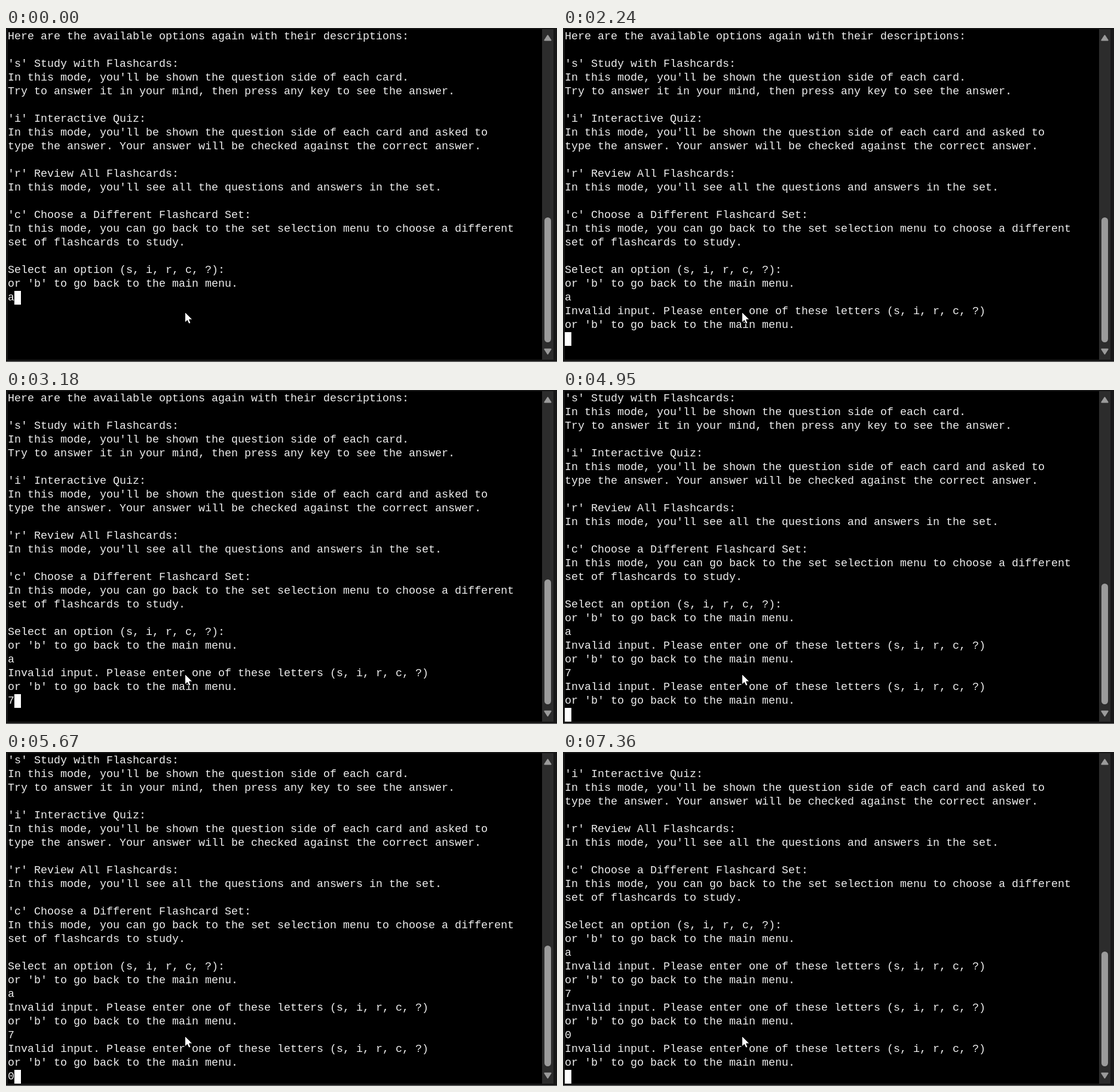
Recreate the animation shown at these times as an HTML page. Size 922 by 559 pixels, loop 8 s.

```html
<!DOCTYPE html>
<html lang="en">
<head>
<meta charset="utf-8">
<title>Flashcard terminal</title>
<style>
  :root { --row: 23px; --col: 11px; --loop: 8s step-end infinite; }
  html, body { margin: 0; width: 100%; height: 100%; overflow: hidden; background: #181818; }
  body { position: relative; }
  body > *, .cursor, .thumb { position: absolute; }

  .back { left: 3px; top: 2px; width: 894px; height: 553px; background: #000; }
  .edge { left: 0; top: 558px; width: 100%; height: 1px; background: #808080; }
  .screen { left: 3px; top: 3px; width: 894px; height: calc(24 * var(--row)); overflow: hidden; }
  .log {
    position: relative; margin: 0; overflow: hidden; color: #eee;
    font: 18.33px/var(--row) "Liberation Mono", monospace;
    white-space: pre; font-variant-ligatures: none;
    animation: grow var(--loop);
  }
  .cursor {
    left: 0; bottom: 0; width: var(--col); height: var(--row); background: #fff;
    animation: type var(--loop);
  }
  .bar { left: 897px; top: 2px; width: 19px; height: 553px; background: #2c2c2c; }
  .thumb {
    left: 4px; bottom: 29px; width: 11px; border-radius: 5.5px; background: #9b9b9b;
    animation: shrink var(--loop);
  }
  .overlay { left: 0; top: 0; }

  /* The log is cut below the cursor row; the cursor hides the next key until it is typed. */
  @keyframes grow {
    0%      { height: calc(20 * var(--row)); margin-top: 0; }
    10.5%   { height: calc(23 * var(--row)); margin-top: 0; }
    48.25%  { height: calc(26 * var(--row)); margin-top: calc(-2 * var(--row)); }
    79.875%, 100% { height: calc(29 * var(--row)); margin-top: calc(-5 * var(--row)); }
  }
  @keyframes type {
    0%, 39.75%, 70.875% { left: var(--col); }
    10.5%, 48.25%, 79.875%, 100% { left: 0; }
  }
  @keyframes shrink {
    0%      { height: 209px; }
    48.25%  { height: 202px; }
    79.875%, 100% { height: 192px; }
  }
</style>
</head>
<body>
<div class="back"></div>
<div class="edge"></div>
<div class="screen"><div class="log">Here are the available options again with their descriptions:

's' Study with Flashcards:
In this mode, you'll be shown the question side of each card.
Try to answer it in your mind, then press any key to see the answer.

'i' Interactive Quiz:
In this mode, you'll be shown the question side of each card and asked to
type the answer. Your answer will be checked against the correct answer.

'r' Review All Flashcards:
In this mode, you'll see all the questions and answers in the set.

'c' Choose a Different Flashcard Set:
In this mode, you can go back to the set selection menu to choose a different
set of flashcards to study.

Select an option (s, i, r, c, ?):
or 'b' to go back to the main menu.
a
Invalid input. Please enter one of these letters (s, i, r, c, ?)
or 'b' to go back to the main menu.
7
Invalid input. Please enter one of these letters (s, i, r, c, ?)
or 'b' to go back to the main menu.
0
Invalid input. Please enter one of these letters (s, i, r, c, ?)
or 'b' to go back to the main menu.
<i class="cursor"></i></div></div>
<div class="bar"><div class="thumb"></div></div>
<svg class="overlay" width="922" height="559" viewBox="0 0 922 559">
  <g fill="#9b9b9b" stroke="#9b9b9b" stroke-width="2" stroke-linejoin="round">
    <path d="M906.5 12.5L911.7 20.5H901.3z"/>
    <path d="M906.5 545.5L911.7 537.5H901.3z"/>
  </g>
  <path d="M299.5 475.5V493L303.4 489.3L306 495L309 493.7L306.6 488H312z" fill="#fff" stroke="#000"/>
</svg>
</body>
</html>
```
